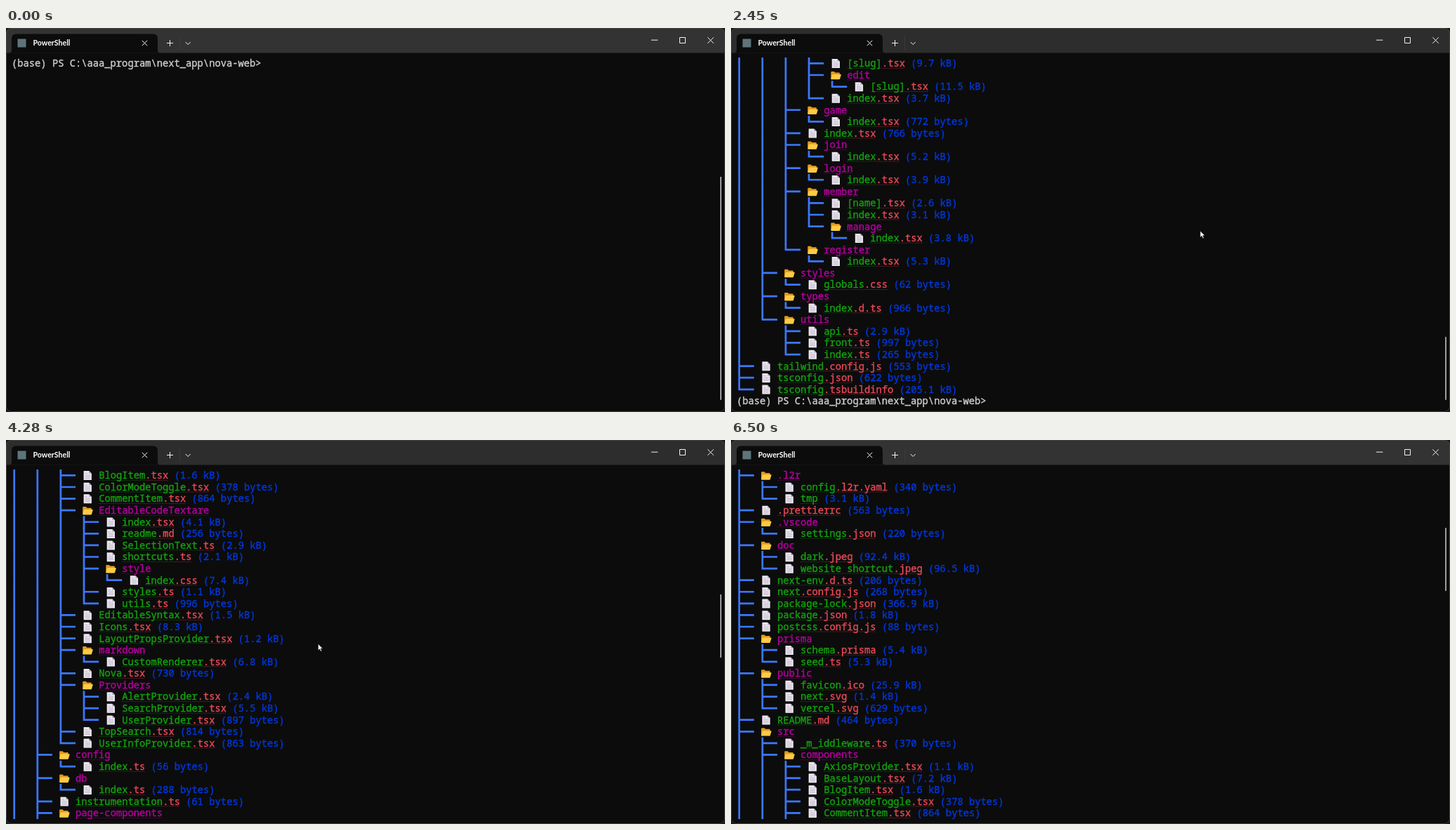
Recreate the animation shown at these times as an HTML page. Size 1024x547 px, loop 6.6 s.

```html
<!DOCTYPE html>
<html lang="en">
<head>
<meta charset="utf-8">
<title>Terminal file tree</title>
<style>
  html, body { margin: 0; width: 100%; height: 100%; overflow: hidden; background: #161a18; }
  svg { display: block; width: 1024px; height: 547px; }
  text { white-space: pre; }
  .mono { font: 13.79px "Noto Sans Mono", "DejaVu Sans Mono", monospace; }
  .mono text { stroke-width: .4px; }
  .title { font: 700 10.6px Lato, "Open Sans", sans-serif; fill: #fff; }
  .chrome { fill: none; stroke: #f2f2f2; stroke-width: 1; }
</style>
</head>
<body>
<svg viewBox="0 0 1024 547">
  <defs>
    <clipPath id="view"><rect x="0" y="42" width="1014" height="498"/></clipPath>
    <clipPath id="window"><rect width="1024" height="547" rx="7"/></clipPath>
    <g id="file">
      <path d="M3 1.6h7.600l3.700 3.700v9.300h-11.300z" fill="#ebe6f0"/>
      <path d="M10.600 1.600v3.700h3.700z" fill="#b4acbc"/>
      <path d="M5 5.2h3.500M5 7.700h7.300M5 9.900h7.300M5 12.100h7.300" stroke="#b3abbb" stroke-width=".8"/>
    </g>
    <g id="folder">
      <path d="M1.6 3.8q0-1 1-1h3.6l1.6 1.6h5.4q1 0 1 1v7.8h-12.6z" fill="#e19a1c"/>
      <path d="M4 6.8h11.6q.7 0 .5.8l-1.7 5.9q-.2.7-1 .7h-11q-.9 0-.7-.9l1.5-5.8q.2-.7.8-.7z" fill="#ffcb45"/>
    </g>
  </defs>
  <g clip-path="url(#window)">
    <rect width="1024" height="547" fill="#0c0c0c"/>
    <rect id="bar" width="1024" height="35.5"/>
    <path d="M4 35.5q4 0 4-4V15q0-6.5 6.5-6.5h195q6.5 0 6.5 6.5v16.5q0 4 4 4z" fill="#0c0c0c"/>
    <rect x="16.5" y="15.5" width="12" height="12" fill="#5f7479"/>
    <text class="title" x="38.5" y="25.4">PowerShell</text>
    <path class="chrome" d="M193.800 17.800l7.400 7.400m0-7.400l-7.400 7.400M229 21.500h9M233.500 17v9M255.700 20l3.500 3.500 3.500-3.500M919 17.200h9.300M959.500 13.500h8v8h-8zM999.300 13.300l8.500 8.500m0-8.500l-8.500 8.500"/>
    <path d="M247.500 11.500v20" stroke="#3a3a3a"/>
    <g clip-path="url(#view)"><g id="screen" class="mono"></g></g>
    <rect id="thumb" x="1017" width="2" rx="1" fill="#9d9d9d"/>
    <path id="mouse" d="M0 0v9.200l2.200-2 1.500 3.400 1.600-.7-1.500-3.300h3z" fill="#fff" stroke="#111" stroke-width=".6"/>
    <rect x=".5" y=".5" width="1023" height="546" rx="7" fill="none" stroke="#424242"/>
  </g>
</svg>
<script>
const LOOP = 6600, LEFT = 8, TOP = 42.3, CELL = 8.275, ROW = 16.586, ROWS = 30;
const C = {
  text: '#cccccc', red: '#e74856', darkRed: '#c50f1f', green: '#13a10e', blue: '#0037da',
  guide: '#3b78ff', cyan: '#3a96dd', magenta: '#b4009e', yellow: '#c19c00',
  command: '#f9f1a5', hint: '#484848', progress: '#729c1f'
};
const FOLDER = String.raw`C:\aaa_program\next_app\nova-web`;
const PROMPT = `(base) PS ${FOLDER}>`;
const COMMAND = 'syncl2r show';
const HISTORY = String.raw`syncl2r diff .\src\pages\member\index.tsx`;
const HOST = '198.51.100.247:22', USER = '@demo';

// Depth, name, then size: decimals are kB, integers are bytes, a slash marks a folder.
const TREE = `1.env.development 198
1.env.local 155
1.env.production 196
1.eslintrc.json 43
1.gitignore 451
1.l2r/
2config.l2r.yaml 340
2tmp 3.1
1.prettierrc 563
1.vscode/
2settings.json 220
1doc/
2dark.jpeg 92.4
2website shortcut.jpeg 96.5
1next-env.d.ts 206
1next.config.js 268
1package-lock.json 366.9
1package.json 1.8
1postcss.config.js 88
1prisma/
2schema.prisma 5.4
2seed.ts 5.3
1public/
2favicon.ico 25.9
2next.svg 1.4
2vercel.svg 629
1README.md 464
1src/
2_m_iddleware.ts 370
2components/
3AxiosProvider.tsx 1.1
3BaseLayout.tsx 7.2
3BlogItem.tsx 1.6
3ColorModeToggle.tsx 378
3CommentItem.tsx 864
3EditableCodeTextare/
4index.tsx 4.1
4readme.md 256
4SelectionText.ts 2.9
4shortcuts.ts 2.1
4style/
5index.css 7.4
4styles.ts 1.1
4utils.ts 996
3EditableSyntax.tsx 1.5
3Icons.tsx 8.3
3LayoutPropsProvider.tsx 1.2
3markdown/
4CustomRenderer.tsx 6.8
3Nova.tsx 730
3Providers/
4AlertProvider.tsx 2.4
4SearchProvider.tsx 5.5
4UserProvider.tsx 897
3TopSearch.tsx 814
3UserInfoProvider.tsx 863
2config/
3index.ts 56
2db/
3index.ts 288
2instrumentation.ts 61
2page-components/
3blog/
4BlogEdit.tsx 4.6
4BlogList.tsx 2.2
4BlogView.tsx 3.4
3game/
4index.tsx 1.3
3home/
4Banner.tsx 918
4index.tsx 2.7
3login/
4LoginForm.tsx 3.2
3member/
4index.tsx 1.9
4MemberCard.tsx 2.5
2pages/
3_app.tsx 1.4
3_document.tsx 412
3api/
4auth/
5login.ts 1.7
5logout.ts 384
5session.ts 692
4blog/
5delete.ts 845
5list.ts 1.2
5modify.ts 1.6
5new.ts 1.3
5search.ts 974
4file/
5delete.ts 688
5list.ts 731
5upload.ts 1.9
4member/
5info.ts 803
5list.ts 926
5modify.ts 1.4
4post/
5comment.ts 1.1
5delete.ts 764
5delComment.ts 755
5modify.ts 1.5
5new.ts 1.1
5search.ts 968
4user/
5createInvitationCode.ts 812
5file.ts 0
5info.ts 728
5modify.ts 1.5
5register.ts 1.8
5salt.ts 476
3blog/
4[slug].tsx 9.7
4edit/
5[slug].tsx 11.5
4index.tsx 3.7
3game/
4index.tsx 772
3index.tsx 766
3join/
4index.tsx 5.2
3login/
4index.tsx 3.9
3member/
4[name].tsx 2.6
4index.tsx 3.1
4manage/
5index.tsx 3.8
3register/
4index.tsx 5.3
2styles/
3globals.css 62
2types/
3index.d.ts 966
2utils/
3api.ts 2.9
3front.ts 997
3index.ts 265
1tailwind.config.js 553
1tsconfig.json 622
1tsconfig.tsbuildinfo 205.1`.split('\n');

const $ = id => document.getElementById(id);
const screen = $('screen');
const colX = col => LEFT + col * CELL;
const rows = [];

function add(parent, tag, attrs) {
  const el = document.createElementNS('http://www.w3.org/2000/svg', tag);
  for (const k in attrs) el.setAttribute(k, attrs[k]);
  return parent.appendChild(el);
}

function newRow() {
  const g = add(screen, 'g', { transform: `translate(0 ${rows.length * ROW})` });
  rows.push(g);
  return g;
}

function write(row, col, str, color, underline) {
  const el = add(row, 'text', { x: colX(col), y: 13, fill: color, stroke: color });
  el.textContent = str;
  const dotted = underline === 'dotted';
  if (underline) add(row, 'path', {
    d: `M${colX(col)} 15.1h${str.length * CELL}`, stroke: color, 'stroke-width': .9,
    'stroke-dasharray': dotted ? '1 1.07' : 'none', opacity: dotted ? .6 : .85
  });
  return el;
}

const icon = (row, col, name) =>
  add(row, 'use', { href: '#' + name, x: colX(col) + .3, y: .2 });

function buildHeader() {
  let r = newRow();
  write(r, 0, 'start link to', C.cyan);
  write(r, 14, HOST, C.red, 'solid');
  write(r, 31, USER, C.darkRed, 'solid');
  write(r, 37, 'success', C.green);
  r = newRow();
  write(r, 0, 'pulling', C.green);
  write(r, 8, String.raw`src\pages\member\index.tsx`, C.yellow);
  add(r, 'rect', { x: colX(35), y: 7, width: 40 * CELL, height: 2.6, fill: C.progress });
  write(r, 76, '100%', C.magenta);
  write(r, 81, '0:00:00', C.cyan);
  write(newRow(), 0, `connection(${HOST}${USER}) close`, C.text);
  write(newRow(), 0, PROMPT, C.text);
  write(newRow(), 0, PROMPT, C.text);
  write(newRow(), 0, 'file tree prepare to sync:', C.red);
  r = newRow();
  icon(r, 0, 'folder');
  write(r, 3, FOLDER, C.text, 'dotted');
}

function buildTree() {
  const depths = TREE.map(line => +line[0]);
  // Whether a later entry shares this level before the branch closes.
  const continues = (i, level) => {
    const next = depths.findIndex((d, j) => j > i && d <= level);
    return next >= 0 && depths[next] === level;
  };
  TREE.forEach((line, i) => {
    const row = newRow(), depth = depths[i], mid = 8.1, col = depth * 4 + 3;
    let d = '';
    for (let level = 1; level <= depth; level++) {
      const x = colX(level * 4 - 4) + 3.7, more = continues(i, level);
      if (more) d += `M${x} -.3V${ROW + .2}`;
      else if (level === depth) d += `M${x} -.3V${mid + 1.3}`;
      if (level === depth) d += `M${x} ${mid}H${colX(level * 4 - 1)}`;
    }
    add(row, 'path', { d, fill: 'none', stroke: C.guide, 'stroke-width': 2.7 });
    if (line.endsWith('/')) {
      icon(row, depth * 4, 'folder');
      write(row, col, line.slice(1, -1), C.magenta, 'dotted');
      return;
    }
    icon(row, depth * 4, 'file');
    const [, stem, ext, size] = line.match(/^\d([^.]*?)(\.\S*)? ([\d.]+)$/);
    const suffix = ext || '';
    if (stem) write(row, col, stem, C.green, 'dotted');
    if (suffix) write(row, col + stem.length, suffix, C.red, 'dotted');
    const unit = size.includes('.') ? 'kB' : 'bytes';
    write(row, col + stem.length + suffix.length + 1, `(${size} ${unit})`, C.blue);
  });
}

buildHeader();
buildTree();
write(newRow(), 0, PROMPT, C.text);

const TOTAL = rows.length, INPUT = 4, INPUT_COL = PROMPT.length + 1;
const program = write(rows[INPUT], INPUT_COL, '', C.command);
const args = write(rows[INPUT], INPUT_COL + 7, '', C.text);
const hint = write(rows[INPUT], INPUT_COL, '', C.hint);
const caret = add(screen, 'rect', { width: 1, height: ROW, fill: '#fff' });

// Linear interpolation over [time, ...values] points.
function track(points, t) {
  if (t <= points[0][0]) return points[0].slice(1);
  for (let i = 1; i < points.length; i++) {
    const a = points[i - 1], b = points[i];
    if (t <= b[0]) {
      const k = (t - a[0]) / (b[0] - a[0]);
      return a.slice(1).map((v, j) => v + (b[j + 1] - v) * k);
    }
  }
  return points[points.length - 1].slice(1);
}

const PRINTED = [[1640, 6], [1760, 7], [1960, TOTAL]];
const SCROLL = [[3000, 120], [3380, 108], [4280, 39], [5080, 0], [5200, 0], [5560, 12]];
const THUMB = [[2950, 440], [3380, 402], [4280, 220], [5130, 78], [5200, 78], [5600, 125]];
const MOUSE = [
  [[100, 985, 535], [400, 800, 380], [690, 690, 219], [780, 690, 219]],
  [[2130, 742, 250], [2450, 668.5, 289], [2780, 570, 300], [3380, 483.5, 295.5],
   [4280, 444.5, 290.5], [5200, 441, 285.5], [5600, 480, 328], [6340, 966, 545], [6400, 1000, 560]]
];

function typedCount(t) {
  if (t < 780) return 0;
  const n = t < 1160 ? Math.min(6, 1 + Math.floor((t - 780) / 60)) : 7 + Math.floor((t - 1160) / 36);
  return Math.min(COMMAND.length, n);
}

function drawInput(t) {
  const n = typedCount(t), typed = COMMAND.slice(0, n);
  program.textContent = typed.slice(0, 7);
  args.textContent = typed.slice(7);
  hint.textContent = n ? (n < 9 ? HISTORY : COMMAND).slice(n) : '';
  hint.setAttribute('x', colX(INPUT_COL + n));
  return n;
}

function drawCaret(t, typed, printed) {
  let row = INPUT, col = INPUT_COL + typed;
  if (t >= 1460) [row, col] = printed === TOTAL ? [TOTAL - 1, INPUT_COL] : [printed, 0];
  const on = (t >= 300 && t < 2400) || (t >= 2680 && t < 3000);
  caret.setAttribute('visibility', on ? 'visible' : 'hidden');
  caret.setAttribute('x', colX(col) - .2);
  caret.setAttribute('y', row * ROW);
}

function drawMouse(t) {
  const path = MOUSE.find(p => t >= p[0][0] && t < p[p.length - 1][0]);
  $('mouse').setAttribute('visibility', path ? 'visible' : 'hidden');
  if (path) $('mouse').setAttribute('transform', `translate(${track(path, t)})`);
}

function render(t) {
  const printed = t < 1640 ? INPUT + 1 : Math.floor(track(PRINTED, t)[0]);
  const scrolled = t >= 2900;
  const top = scrolled ? 3 * Math.round(track(SCROLL, t)[0] / 3) : Math.max(INPUT, printed - ROWS);
  const lines = Math.max(INPUT + ROWS, printed) + 12;
  const thumbY = scrolled ? track(THUMB, t)[0] : 42 + 488 * (top + 12) / lines;

  rows.forEach((row, i) => {
    const shown = i < printed && i >= top && i < top + ROWS;
    row.setAttribute('display', shown ? 'inline' : 'none');
  });
  screen.setAttribute('transform', `translate(0 ${TOP - top * ROW})`);
  $('thumb').setAttribute('y', thumbY);
  $('thumb').setAttribute('height', 488 * ROWS / lines);
  $('bar').setAttribute('fill', t >= 300 && t < 6400 ? '#2d2d2d' : '#333333');
  drawCaret(t, drawInput(t), printed);
  drawMouse(t);
}

const start = performance.now();
function frame() {
  render((performance.now() - start) % LOOP);
  requestAnimationFrame(frame);
}
render(0);
requestAnimationFrame(frame);
</script>
</body>
</html>
```
